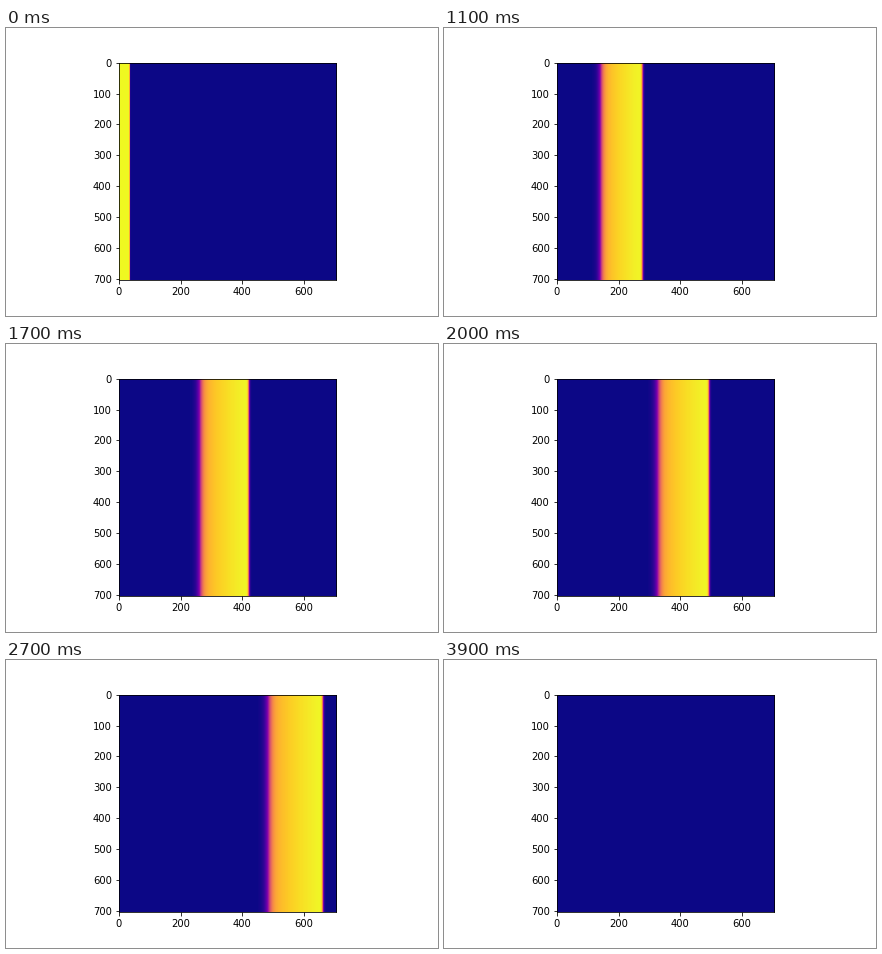
Recreate the animation shown at these times as a matplotlib script. Size 432 by 288 pixels, loop 4800 ms.

```python
import numpy as np
import matplotlib.pyplot as plt
from matplotlib.animation import FuncAnimation

SIZE = 704          # cells along each side
STEP = 100          # ms per frame
FRAMES = 48
LAST_CHANGE = 3900  # the medium is at rest from here on
SEED_WIDTH = 35     # strip excited at the start
SPEED = 0.2392      # cells per ms, once the wave is settled
RISE = 7.0          # ms, steepness of the wave front
FALL = 29.0         # ms, softness of the wave back
KNEE = 0.62         # plateau level just before a cell recovers

x = np.arange(SIZE)

# The wave starts slowly, then travels at a constant speed.
travel = np.maximum(x - SEED_WIDTH, 0)
front_time = travel / SPEED + 96 * (1 - np.exp(-travel / 64))

# Cells stay excited longer the farther they are from the seed.
duration = 785 - 369 * np.exp(-x / 233)


def sigmoid(z):
    return 1 / (1 + np.exp(-np.clip(z, -50, 50)))


def excitation(t):
    """Level of every cell along the wave's path at time t."""
    if t == 0:
        return (x < SEED_WIDTH).astype(float)
    age = t - front_time
    remaining = np.clip(1 - age / duration, 0, 1)
    plateau = KNEE + (1 - KNEE) * remaining ** 0.35
    return plateau * sigmoid(age / RISE) * sigmoid((duration - age) / FALL)


def field(i):
    return np.tile(excitation(min(i * STEP, LAST_CHANGE)), (SIZE, 1))


fig = plt.figure(figsize=(6, 4), dpi=72, facecolor="white")
fig.subplots_adjust(left=0.125, right=0.9, bottom=0.125, top=0.88)
ax = fig.add_subplot()
image = ax.imshow(field(0), cmap="plasma", vmin=0, vmax=1)
ax.set_xticks(range(0, SIZE, 200))
ax.set_yticks(range(0, SIZE, 100))


def update(i):
    image.set_data(field(i))
    return (image,)


anim = FuncAnimation(fig, update, frames=FRAMES, interval=STEP, repeat=True)
plt.show()
```
